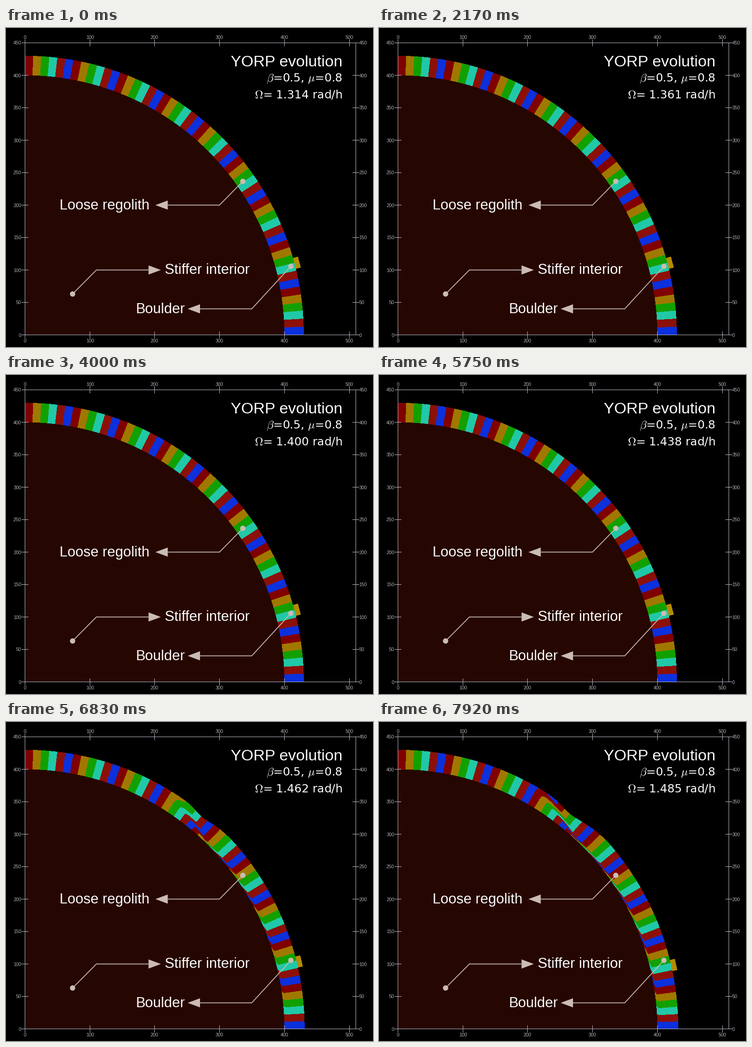
Animation, 802 px wide and 698 px high, one loop 8 s. Source, as a matplotlib script:

```python
import numpy as np
import matplotlib.pyplot as plt
from matplotlib.animation import FuncAnimation
from matplotlib.patches import Circle, Polygon

W, H, DPI = 802, 698, 128
LOOP, TICK, FPS = 8000, 50, 12
X0, Y0, SX, SY = 41.5, 671.5, 1.417, 1.42
CORE, RIM = 400, 430
LEFT, RIGHT, TOP, BOTTOM = 41.5, 764.5, 32.5, 671.5

INTERIOR = (38, 6, 0)
BOULDER = (180, 140, 0)
STRIPES = np.array([(128, 0, 0), (160, 120, 0), (18, 160, 0),
                    (32, 200, 168), (140, 16, 8), (12, 48, 220)], np.uint8)
AXIS = "#c0bece"
POINTER = "#cabcb4"

plt.rcParams["mathtext.fontset"] = "cm"
plt.rcParams["font.family"] = "DejaVu Sans"

fig = plt.figure(figsize=(W / DPI, H / DPI), dpi=DPI, facecolor="black")
ax = fig.add_axes([0, 0, 1, 1])
ax.set_xlim(0, W)
ax.set_ylim(H, 0)
ax.axis("off")


def pt(px):
    return px * 72 / DPI


def label(x, y, s, size, color="#fafafa", **kw):
    return ax.text(x, y, s, fontsize=pt(size), color=color, **kw)


def line(xs, ys, color, width):
    ax.plot(xs, ys, color=color, lw=pt(width), snap=False,
            solid_capstyle="butt", solid_joinstyle="miter", zorder=2)


def smooth(t):
    t = np.clip(t, 0, 1)
    return t * t * (3 - 2 * t)


# Polar coordinates of every pixel; only the ring changes over time
py, px = np.mgrid[0:H, 0:W] + 0.5
gx, gy = (px - X0) / SX, (Y0 - py) / SY
radius = np.hypot(gx, gy)
quadrant = (gx >= 0) & (gy >= 0)
base = np.zeros((H, W, 3), np.uint8)
base[quadrant & (radius < CORE)] = INTERIOR
ring = quadrant & (radius >= CORE) & (radius < RIM + 14)
r = radius[ring]
phi = np.degrees(np.arctan2(gx[ring], gy[ring]))
depth = (r - CORE) / (RIM - CORE)


def slide(step):
    return max(0, (step - 70.5) / 24.5) ** 0.72


def regolith(a):
    """Colours of the ring when the landslide has progressed by a."""
    scarp = 39.6 - 2.8 * a
    plane = np.maximum(0.05, 0.5 - 0.08 * (phi - scarp))
    moving = smooth((depth - plane) / (0.1 + 0.45 * plane) + 0.5)
    headwall = smooth((phi - 34 + 5.5 * a) / 8)
    shift = 0.103 * a * (90 - phi) * moving * headwall

    sag = 5.5 * min(1, 1.4 * a) * np.exp(-((phi - scarp - 2) / (1.5 + 2 * a)) ** 2)
    bulge = a * smooth((phi - 42) / 7) * (3.2 - 0.025 * (phi - 50))
    surface = RIM - sag + bulge

    index = np.floor((phi - shift) * 0.6).astype(int) % 6
    colors = STRIPES[index]
    colors[r >= surface] = 0
    start = 74 + 1.8 * a
    rock = (phi > start) & (phi < start + 2.3)
    rock &= (r >= surface) & (r < RIM + 7.8 + 2.4 * a)
    colors[rock] = BOULDER
    return colors


def picture(step):
    img = base.copy()
    img[ring] = regolith(slide(step))
    return img


def draw_axes():
    line([LEFT, RIGHT, RIGHT, LEFT, LEFT], [TOP, TOP, BOTTOM, BOTTOM, TOP],
         AXIS, 1)
    style = dict(size=10.5, color="#b0b0b0", family="Liberation Sans")
    for v in range(0, 501, 100):
        x = np.floor(X0 + v * SX) + 0.5
        for y, ty in ((TOP, 19.5), (BOTTOM, 684)):
            line([x, x], [y - 7.5, y + 7.5], AXIS, 1)
            label(x, ty, str(v), ha="center", va="center_baseline", **style)
    for v in range(0, 451, 50):
        y = np.floor(Y0 - v * SY) + 0.5
        for x, tx, side in ((LEFT, 33.5, "right"), (RIGHT, 771.5, "left")):
            line([x - 7.5, x + 7.5], [y, y], AXIS, 1)
            label(tx, y, str(v), ha=side, va="center_baseline", **style)


def pointer(dot, elbow, tip, name, tx):
    """Dot, bent leader, arrow head and its caption."""
    x, y = tip
    back = x + 27 * np.sign(elbow[0] - x)
    line([dot[0], elbow[0], back], [dot[1], elbow[1], y], POINTER, 1.8)
    ax.add_patch(Polygon([(x, y), (back, y - 10), (back, y + 10)],
                         fc=POINTER, ec="none", zorder=3))
    ax.add_patch(Circle(dot, 5.8, fc=POINTER, ec="none", zorder=3))
    label(tx, y + 9, name, 31.2, family="Liberation Sans", va="baseline")


image = ax.imshow(picture(0), extent=(0, W, H, 0), interpolation="nearest",
                  aspect="auto", zorder=0)
draw_axes()
pointer((517.5, 335.5), (466.5, 387.5), (326.5, 387.5), "Loose regolith", 117)
pointer((145.5, 582), (197.5, 529.5), (338.5, 529.5), "Stiffer interior", 347)
pointer((622.5, 521.5), (537, 614.5), (397, 614.5), "Boulder", 283)

right = dict(ha="right", va="baseline")
label(735.5, 83.5, "YORP evolution", 34.4, family="Liberation Sans", **right)
label(735, 116.5, r"$\beta$=0.5, $\mu$=0.8", 25, **right)
spin = label(735, 153.5, "", 25, **right)


def update(tick):
    # The simulation advances in whole steps, 12 per second
    step = int((tick * TICK + 45) * FPS / 1000)
    image.set_data(picture(step))
    spin.set_text(rf"$\Omega$= {1.314 + 0.0018 * step:.3f} rad/h")
    return image, spin


update(0)
anim = FuncAnimation(fig, update, frames=LOOP // TICK, interval=TICK,
                     init_func=lambda: update(0), repeat=True, repeat_delay=0)
plt.show()
```
